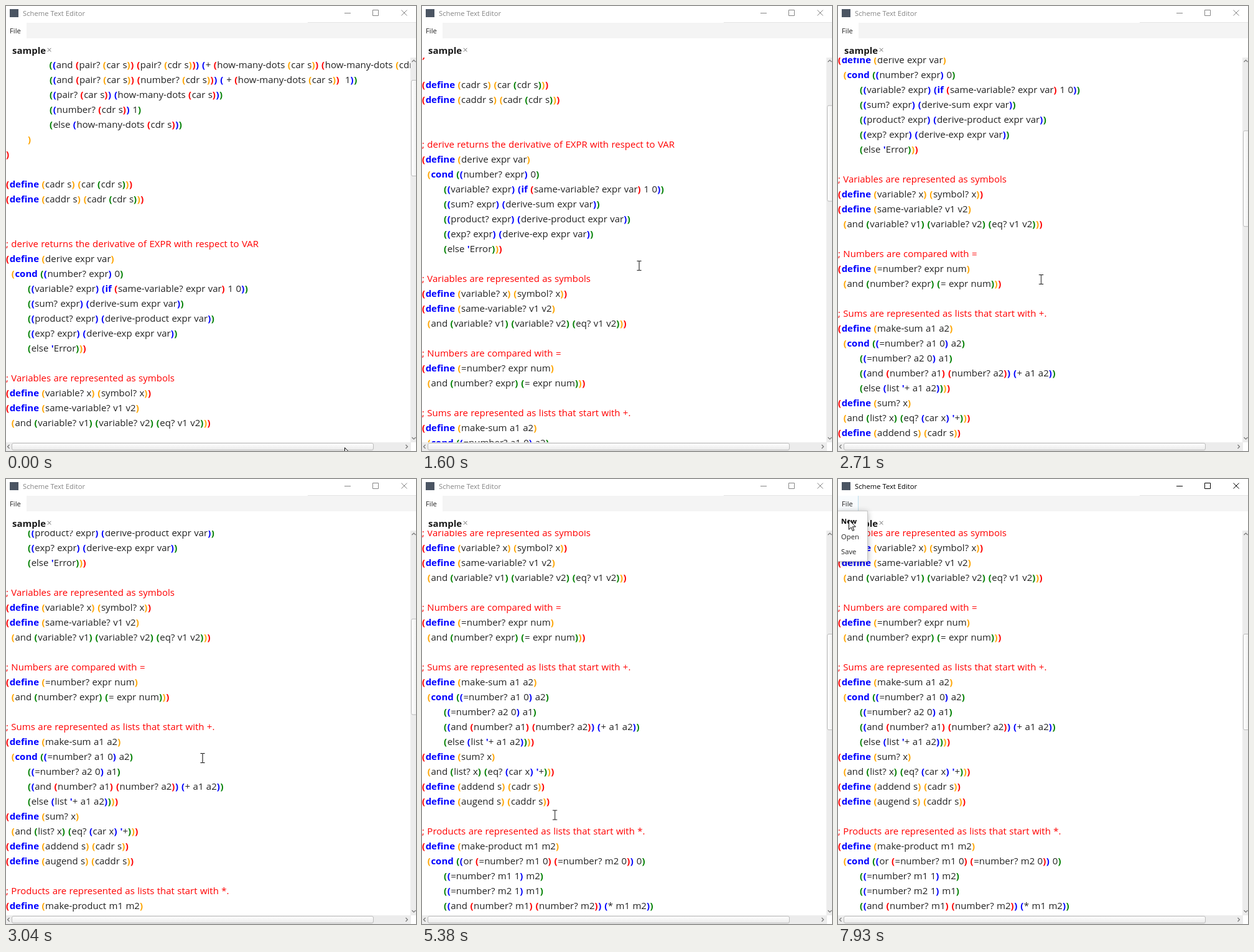
Write an HTML page that moves like this. It is 659 px wide and 716 px high and loops after 8 s.

```html
<!DOCTYPE html>
<html lang="en">
<head>
<meta charset="utf-8">
<title>Scheme Text Editor</title>
<style>
@property --scroll { syntax: "<number>"; inherits: true; initial-value: 0; }

html, body { margin: 0; width: 100%; height: 100%; overflow: hidden; background: #fff; }
#stage {
  position: relative; width: 659px; height: 716px; overflow: hidden; background: #fff;
  font: 11.25px/16px "Open Sans", "Noto Sans", sans-serif; color: #222;
  animation: scroll 8s linear infinite;
}
#stage * { box-sizing: border-box; }
#stage > * { position: absolute; }
svg { overflow: visible; fill: none; }

/* title bar */
.icon { left: 6px; top: 5px; width: 14px; height: 13px; background: #4b5563; }
.title { left: 27px; top: 4px; white-space: nowrap; animation: activate 8s step-end infinite; }
.buttons { left: 0; top: 0; stroke: currentColor; animation: activate 8s step-end infinite; }
.edge { left: 485px; top: 26px; width: 174px; height: 1px; background: #e4e4e4; }

/* menu bar and tab */
.bar { left: 32px; top: 27px; right: 0; height: 25px; background: #f4f4f4; }
.file {
  left: 0; top: 27px; width: 33px; height: 25px; padding: 5px 0 0 6px;
  border: solid transparent; border-width: 0 1px 0 0;
  animation: press 8s step-end infinite;
}
.tab { left: 10px; top: 60px; font-size: 15px; line-height: 22px; font-weight: bold; color: #1a1a1a; }
.shut { left: 66px; top: 67px; stroke: #666; }

/* editor */
.view { left: 0; top: 83px; width: 650px; height: 619px; overflow: hidden; }
pre {
  position: absolute; left: 0; top: -1px; margin: 0;
  font: 15px/24px "Open Sans", "Noto Sans", sans-serif; word-spacing: .032em;
  transform: translateY(calc(var(--scroll) * -1px));
}
pre b { color: #00f; }
pre i { font-style: normal; color: #f00; }
pre .p { letter-spacing: .036em; }
.d0 { color: #f00 !important; }
.d1 { color: #ffa500 !important; }
.d2 { color: #008000 !important; }

/* scroll bars */
.track { background: #ececec; }
.v { left: 650px; top: 83px; width: 9px; height: 619px; }
.h { left: 0; top: 702px; width: 651px; height: 14px; }
.thumb { border: 1px solid #bcbcbc; border-radius: 3px; }
.v + .thumb {
  left: 651px; top: 119px; width: 11px; height: 155px;
  background: linear-gradient(90deg, #fff, #eee);
  transform: translateY(calc(var(--scroll) * .254px));
}
.h + .thumb { left: 9px; top: 703px; width: 582px; height: 12px; background: linear-gradient(#fff, #eaeaea); }
.arrows { left: 0; top: 0; stroke: #777; stroke-width: 1.2; }

/* popup menu */
.menu {
  left: -1px; top: 51px; width: 49px; height: 82px; padding: 8px 0 0 5px;
  background: #fff; border: 1px solid #c8c8c8; box-shadow: 0 2px 9px rgba(0, 0, 0, .3);
  animation: open 8s step-end infinite;
}
.menu div { height: 24.5px; }
.menu div:first-child { animation: hover 8s step-end infinite; }

/* pointer */
.pointer { left: 0; top: 0; width: 1px; height: 1px; animation: move 8s linear infinite; }
.beam { stroke: #000; animation: beam 8s step-end infinite; }
.arrow { fill: #fff; stroke: #000; animation: arrow 8s step-end infinite; }

@keyframes scroll {
  0%, 6.5% { --scroll: 0; animation-timing-function: steps(4); }
  11.1%, 16.6% { --scroll: 128; animation-timing-function: steps(4); }
  24.5%, 29.8% { --scroll: 256; animation-timing-function: steps(5); }
  37.8%, 42% { --scroll: 416; animation-timing-function: steps(3); }
  48.6%, 100% { --scroll: 512; }
}
@keyframes move {
  0%, .4% { transform: translate(544px, 710px); animation-timing-function: ease-in-out; }
  6.5% { transform: translate(361px, 405px); }
  11.1%, 16.6% { transform: translate(358px, 408px); }
  24.6%, 29.8% { transform: translate(337px, 431px); }
  38% { transform: translate(316px, 449px); }
  40.2%, 42% { transform: translate(314px, 454px); }
  48.8%, 51% { transform: translate(294px, 476px); animation-timing-function: ease-in-out; }
  59.5%, 61.5% { transform: translate(215px, 539px); }
  63.6%, 67% { transform: translate(214px, 542px); }
  68.1%, 71.2% { transform: translate(212px, 536px); animation-timing-function: ease-in-out; }
  81.2%, 81.7% { transform: translate(18px, 56px); }
  83%, 85.8% { transform: translate(18px, 49px); }
  87.5%, 97.2% { transform: translate(18px, 43px); }
  99.1%, 100% { transform: translate(17px, 65px); }
}
@keyframes beam { 0%, 79.8% { visibility: hidden; } 1% { visibility: visible; } }
@keyframes arrow { 0%, 79.8% { visibility: visible; } 1% { visibility: hidden; } }
@keyframes activate { 0% { color: #858585; } 91.6%, 100% { color: #000; } }
@keyframes press {
  0% { background: #fff; border-color: transparent; }
  91.6%, 100% { background: #f8fbfd; border-color: #bfe0ee; }
}
@keyframes open { 0% { visibility: hidden; } 91.9%, 100% { visibility: visible; } }
@keyframes hover { 0% { font-weight: normal; } 98.6%, 100% { font-weight: bold; color: #000; } }
</style>
</head>
<body>
<div id="stage">
  <div class="icon"></div>
  <div class="title">Scheme Text Editor</div>
  <svg class="buttons" width="659" height="27">
    <path d="M544 11.5h10M589.5 6.5h9v9h-9zM635.5 6.5l9 9m0-9l-9 9"/>
  </svg>
  <div class="bar"></div>
  <div class="edge"></div>
  <div class="file">File</div>
  <div class="tab">sample</div>
  <svg class="shut" width="7" height="7"><path d="M.8.8l5.6 5.6m0-5.6L.8 6.4"/></svg>

  <div class="view"><pre id="code"></pre></div>

  <div class="track v"></div><div class="thumb"></div>
  <div class="track h"></div><div class="thumb"></div>
  <svg class="arrows" width="659" height="716">
    <path d="M652.5 90l3-3 3 3M652.5 694l3 3 3-3M5.500 706l-3 3 3 3M642.500 706l3 3-3 3"/>
  </svg>

  <div class="menu"><div>New</div><div>Open</div><div>Save</div></div>

  <svg class="pointer">
    <path class="beam" d="M-3.500-7.500h3l.5.5.5-.5h3M0-7.500v15M-3.500 7.500h3l.5-.5.5.5h3"/>
    <path class="arrow" d="M.5.7v15.600l3.600-3.500 2.400 5.600 2.300-1-2.400-5.500h5z"/>
  </svg>
</div>

<script>
const code = `                ((and (pair? (car s)) (pair? (cdr s))) (+ (how-many-dots (car s)) (how-many-dots (cdr s))))
                ((and (pair? (car s)) (number? (cdr s))) ( + (how-many-dots (car s))  1))
                ((pair? (car s)) (how-many-dots (car s)))
                ((number? (cdr s)) 1)
                (else (how-many-dots (cdr s)))
        )
)

(define (cadr s) (car (cdr s)))
(define (caddr s) (cadr (cdr s)))


; derive returns the derivative of EXPR with respect to VAR
(define (derive expr var)
  (cond ((number? expr) 0)
        ((variable? expr) (if (same-variable? expr var) 1 0))
        ((sum? expr) (derive-sum expr var))
        ((product? expr) (derive-product expr var))
        ((exp? expr) (derive-exp expr var))
        (else 'Error)))

; Variables are represented as symbols
(define (variable? x) (symbol? x))
(define (same-variable? v1 v2)
  (and (variable? v1) (variable? v2) (eq? v1 v2)))

; Numbers are compared with =
(define (=number? expr num)
  (and (number? expr) (= expr num)))

; Sums are represented as lists that start with +.
(define (make-sum a1 a2)
  (cond ((=number? a1 0) a2)
        ((=number? a2 0) a1)
        ((and (number? a1) (number? a2)) (+ a1 a2))
        (else (list '+ a1 a2))))
(define (sum? x)
  (and (list? x) (eq? (car x) '+)))
(define (addend s) (cadr s))
(define (augend s) (caddr s))

; Products are represented as lists that start with *.
(define (make-product m1 m2)
  (cond ((or (=number? m1 0) (=number? m2 0)) 0)
        ((=number? m1 1) m2)
        ((=number? m2 1) m1)
        ((and (number? m1) (number? m2)) (* m1 m2))`;

// The visible text begins two parentheses deep.
let depth = 2;
const paren = c => {
  const level = c === "(" ? depth++ : --depth;
  return `<b class="p d${level % 4}">${c}</b>`;
};

document.getElementById("code").innerHTML = code.replace(/;.*|[()]|'|\b(?:define|cond|if)\b/g, m =>
  m[0] === ";" ? `<i>${m}</i>` : /[()]/.test(m) ? paren(m) : `<b>${m}</b>`);
</script>
</body>
</html>
```
